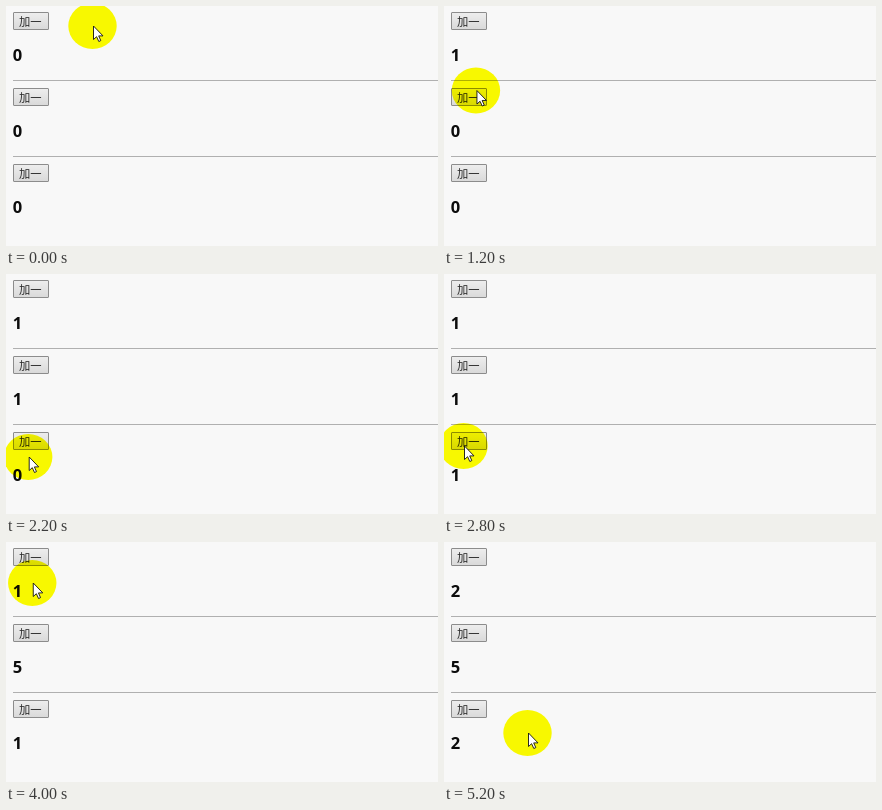
An HTML page that plays this animation: 432 px wide and 240 px high, repeating every 5.4 s.

```html
<!DOCTYPE html>
<html lang="zh">
<head>
<meta charset="utf-8">
<title>加一</title>
<style>
  html, body { margin: 0; width: 100%; height: 100%; overflow: hidden; background: #f8f8f8; }
  svg { display: block; width: 432px; height: 240px; background: #f8f8f8; isolation: isolate; }
  .label { font: 11.3px "Noto Sans CJK SC", "Noto Sans CJK", "Noto Sans CJK JP", sans-serif; fill: #2a2a2a; }
  .value { font: bold 16.5px "Open Sans", "Noto Sans", sans-serif; fill: #0c0c0c; }
  .glow { fill: #ff0; mix-blend-mode: multiply; }
</style>
</head>
<body>
<svg viewBox="0 0 432 240">
  <defs>
    <linearGradient id="face" x1="0" y1="0" x2="0" y2="1">
      <stop offset="0" stop-color="#eeeeee"/>
      <stop offset="1" stop-color="#d9d9d9"/>
    </linearGradient>
  </defs>
  <g id="rows"></g>
  <ellipse id="glow" class="glow" cx="-.5" rx="24.2" ry="23"/>
  <path id="arrow" d="M.5 0V13.5L3.6 10.7 5.8 15.5 7.8 14.6 5.7 9.9H10Z"
        fill="#fff" stroke="#111" stroke-width=".9" stroke-linejoin="round"/>
</svg>
<script>
const LOOP = 5400, STEP = 200, ROWS = 3, PITCH = 76.25;

// Where the pointer rests; hits on a row's button fall on the last steps of the stay.
const stops = [
  { x: 87, y: 20, from: 0, to: 0 },
  { x: 28, y: 17, from: 600, to: 800, row: 0, hits: 1 },
  { x: 33, y: 93, from: 1400, to: 1600, row: 1, hits: 1 },
  { x: 22, y: 189, from: 2400, to: 2400 },
  { x: 20, y: 172, from: 2600, to: 2800, row: 2, hits: 1 },
  { x: 29, y: 95, from: 3200, to: 3800, row: 1, hits: 4 },
  { x: 26, y: 23, from: 4200, to: 4400, row: 0, hits: 1 },
  { x: 37, y: 171, from: 4800, to: 5000, row: 2, hits: 1 },
  { x: 84, y: 191, from: 5200, to: LOOP }
];

const byId = id => document.getElementById(id);
const clamp = (v, lo, hi) => Math.min(hi, Math.max(lo, v));
const easeOut = k => 1 - (1 - k) ** 2;

function add(tag, attrs, text = "") {
  const el = document.createElementNS("http://www.w3.org/2000/svg", tag);
  for (const key in attrs) el.setAttribute(key, attrs[key]);
  el.textContent = text;
  return byId("rows").appendChild(el);
}

function addRow(_, i) {
  const y = Math.floor(6 + PITCH * i);
  add("rect", { x: 7.5, y: y + .5, width: 35, height: 17, rx: .5, fill: "url(#face)", stroke: "#8c8c8c" });
  add("text", { class: "label", x: 13, y: y + 13.7 }, "加一");
  if (i < ROWS - 1) {
    add("rect", { x: 7, y: y + 68, width: 425, height: 1, fill: "#b0b0b0" });
  }
  return add("text", { class: "value", x: 6.7, y: y + 49 }, "0");
}

const values = Array.from({ length: ROWS }, addRow);

function pointerAt(t) {
  const next = stops.findIndex(s => t <= s.to);
  const b = stops[next], a = stops[next - 1] || b;
  const k = t >= b.from ? 1 : easeOut((t - a.to) / (b.from - a.to));
  return [a.x + (b.x - a.x) * k, a.y + (b.y - a.y) * k];
}

function countAt(row, t) {
  return stops
    .filter(s => s.row === row)
    .reduce((sum, s) => sum + clamp(s.hits + (t - s.to) / STEP, 0, s.hits), 0);
}

function draw(time) {
  const t = Math.floor((time % LOOP) / STEP) * STEP;
  const [x, y] = pointerAt(t);
  for (const id of ["glow", "arrow"]) {
    byId(id).setAttribute("transform", `translate(${x} ${y})`);
  }
  values.forEach((el, row) => { el.textContent = countAt(row, t); });
}

const start = performance.now();
function tick() {
  draw(performance.now() - start);
  requestAnimationFrame(tick);
}
tick();
</script>
</body>
</html>
```
